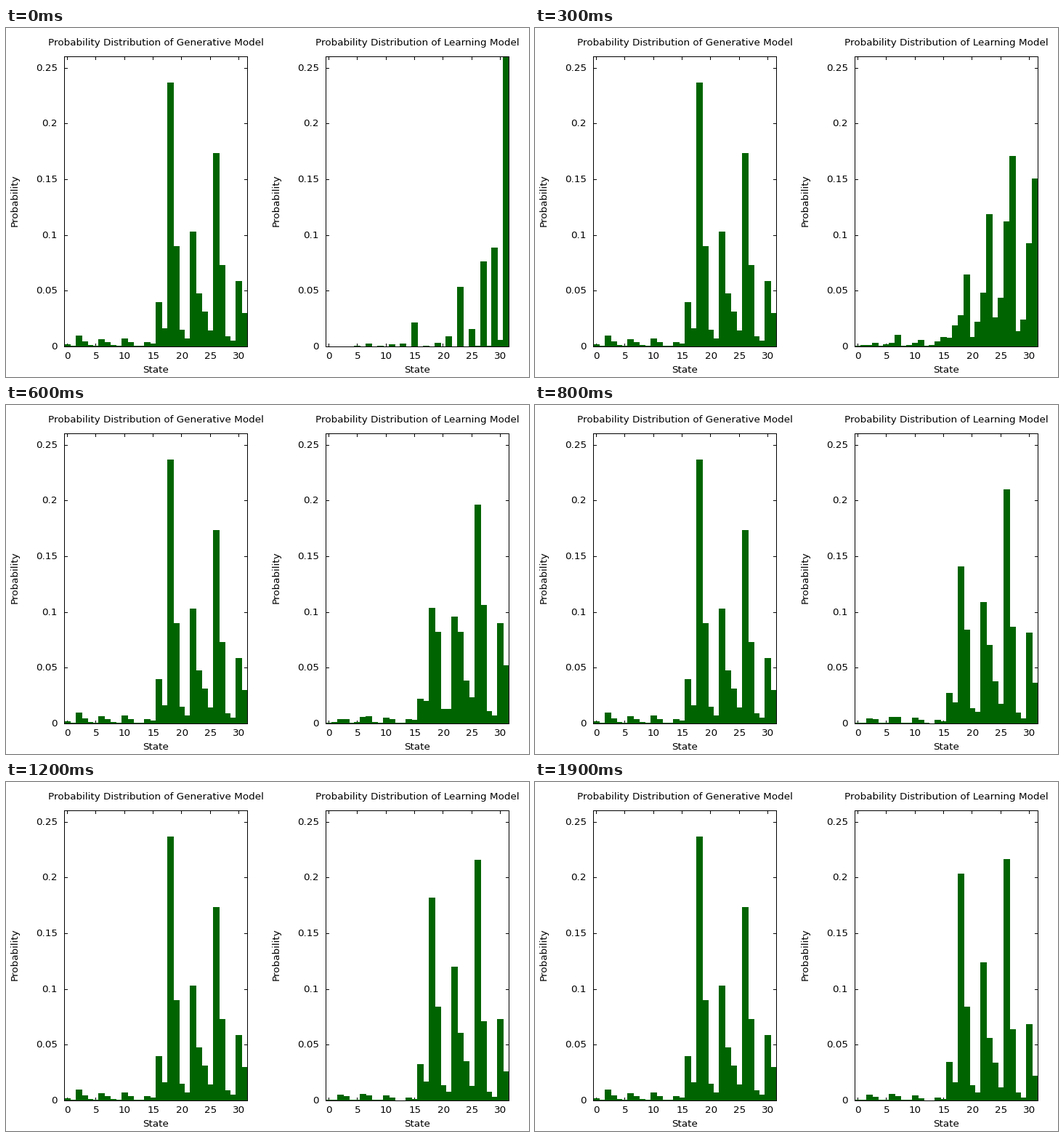
These frames come from a looping animation (720x480 px, 2000 ms). A matplotlib script:

```python
from itertools import combinations
from math import exp, floor

import numpy as np
import matplotlib.pyplot as plt
from matplotlib.animation import FuncAnimation
from matplotlib.patches import Rectangle

plt.rcParams.update({
    "font.family": "DejaVu Sans",
    "font.size": 10.1,
    "toolbar": "None",
    "text.hinting_factor": 8,
})

W, H, DPI = 720, 480, 96
FRAMES, STEP = 20, 100
TOP, BASE, SPAN = 39, 438, 252      # plot box, in pixels
SLOT = SPAN / 32
TICK = 76.65                        # pixels per 0.05 of probability
GREEN = "#006400"

# Each state is five binary units of a Boltzmann machine. Its log weight is
# a sum of 5 biases and 10 pair couplings (01 02 03 04 12 13 14 23 24 34).
UNITS = (np.arange(32)[:, None] >> np.arange(5)) & 1
PAIRS = np.array([UNITS[:, i] * UNITS[:, j]
                  for i, j in combinations(range(5), 2)]).T
FEATURES = np.hstack([UNITS, PAIRS])

GENERATIVE = np.array([-.675, 1.62, -.54, -.26, 3.04,
                       -.08, .19, .1, -.215, .15, -.07, .16, -.25, -.44, .02])

# While learning, the weights settle on LIMIT by a slow and a fast decay.
LIMIT = np.array([-.29, 1.75, -.38, -.22, 3.62,
                  -.13, .09, -.33, -.49, .42, .07, .04, -.655, -.55, .19])
SLOW = np.array([2, -1.2, 1.65, 1.85, -1.5,
                 .05, -.08, -.28, .75, .07, .12, 0, -.25, .1, .65])
FAST = np.array([3.25, .7, 1.02, 1.1, .95,
                 .1, .1, .35, -.25, 0, .1, 0, .3, .4, -.4])


def probabilities(weights):
    p = np.exp(FEATURES @ weights)
    return p / p.sum()


def learned_weights(t):
    return LIMIT + SLOW * exp(-t / 400) + FAST * exp(-t / 150)


def px(v):
    return floor(v + .5)


fig = plt.figure(figsize=(W / DPI, H / DPI), dpi=DPI, facecolor="white")
ax = fig.add_axes([0, 0, 1, 1])
ax.set(xlim=(0, W), ylim=(H, 0))
ax.axis("off")


def box(x, y, w, h, color="black", z=3):
    return ax.add_patch(Rectangle((x, y), w, h, facecolor=color, linewidth=0,
                                  antialiased=False, zorder=z))


def label(x, y, text, ha="center", **kw):
    ax.text(x, y, text, ha=ha, va="baseline", color="black", zorder=4, **kw)


def set_bars(bars, weights):
    for bar, p in zip(bars, probabilities(weights)):
        h = min(px(p * TICK / .05), BASE - TOP - 1)
        bar.set_y(BASE - h)
        bar.set_height(h)


def panel(left, title):
    right = left + SPAN
    edges = [px(left + SLOT * s) for s in range(33)]
    bars = [box(a, BASE, b - a + 1, 0, GREEN, 2)
            for a, b in zip(edges, edges[1:])]

    for y in (TOP, BASE):
        box(left, y, SPAN + 1, 1)
    for x in (left, right):
        box(x, TOP, 1, BASE - TOP + 1)

    # Ticks lie behind the bars, the border in front.
    for s in range(0, 31, 5):
        x = left + SLOT * (s + .5)
        box(px(x), TOP, 1, 5, z=1)
        box(px(x), BASE - 4, 1, 5, z=1)
        label(x + .8, 455, str(s))
    for i in range(6):
        y = px(BASE - i * TICK)
        box(left, y, 5, 1, z=1)
        box(right - 4, y, 5, 1, z=1)
        label(left - 9, y + 4, f"{i * .05:.2g}", ha="right")

    mid = left + SPAN / 2
    label(mid + .5, 24, title)
    label(mid, 474, "State")
    label(left - 64, 237.5, "Probability", rotation=90,
          rotation_mode="anchor")
    return bars


set_bars(panel(80, "Probability Distribution of Generative Model"), GENERATIVE)
learned = panel(440, "Probability Distribution of Learning Model")


def draw(i):
    set_bars(learned, learned_weights(i * STEP))
    return learned


anim = FuncAnimation(fig, draw, frames=FRAMES, interval=STEP,
                     repeat=True, repeat_delay=0, blit=False)
plt.show()
```
